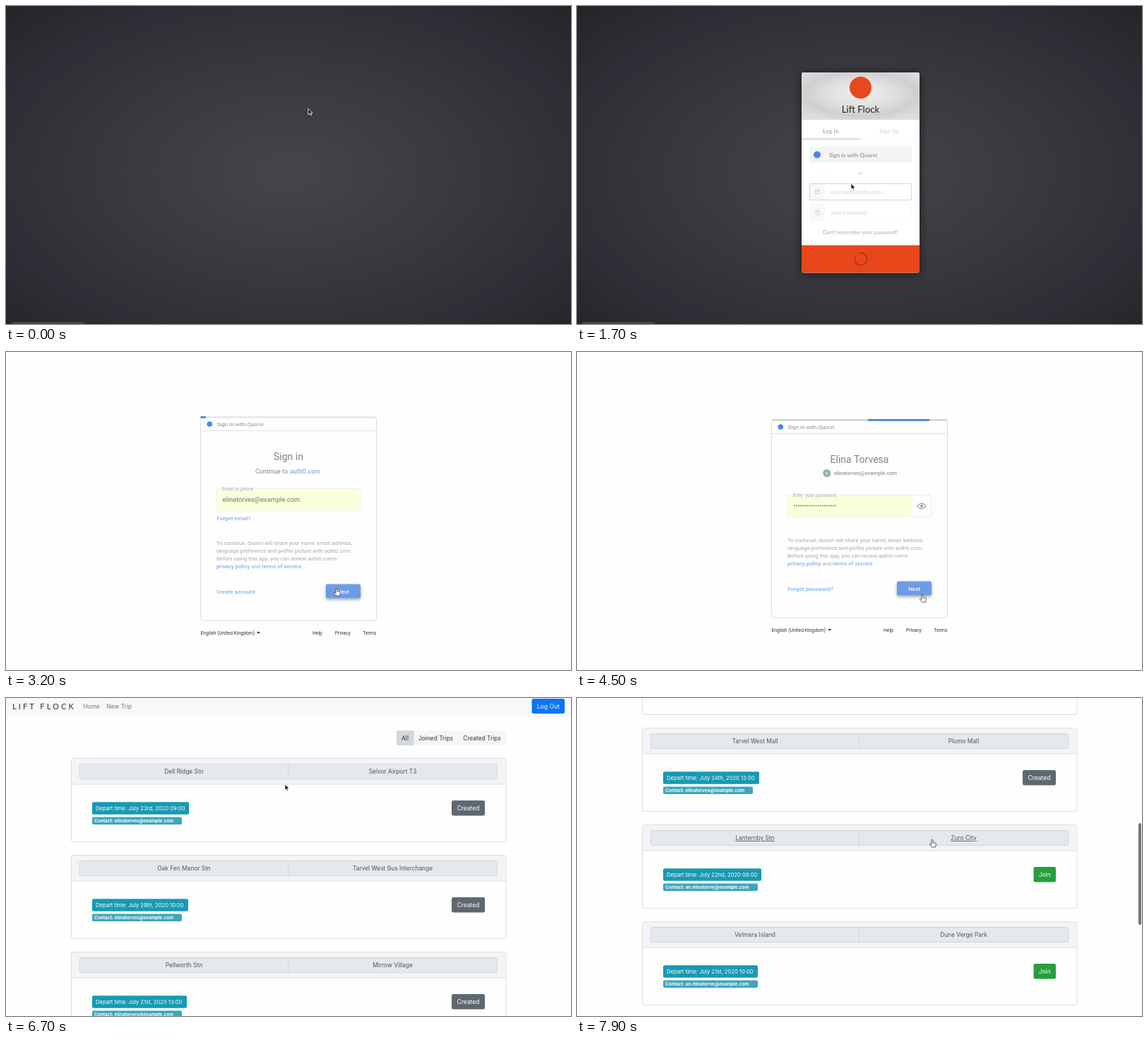
Write an HTML page that moves like this. It is 800 px wide and 450 px high and loops after 8 s.

```html
<!DOCTYPE html>
<html lang="en">
<head>
<meta charset="utf-8">
<style>
html, body { margin: 0; width: 100%; height: 100%; overflow: hidden; background: #fefefe }
svg { display: block; width: 800px; height: 450px }
text { white-space: pre }
.lato { font-family: Lato, sans-serif }
.rob { font-family: Roboto, sans-serif }
.int { font-family: Inter, sans-serif }
</style>
</head>
<body>
<svg viewBox="0 0 800 450">
  <defs>
    <radialGradient id="night" gradientUnits="userSpaceOnUse" cx="0" cy="0" r="1" gradientTransform="translate(400 235) scale(566 330)">
      <stop offset="0" stop-color="#47454b"/><stop offset=".45" stop-color="#39383e"/>
      <stop offset=".75" stop-color="#2f2e36"/><stop offset="1" stop-color="#262429"/>
    </radialGradient>
    <radialGradient id="silver" cx=".5" cy=".45" r=".62">
      <stop offset="0" stop-color="#efefef"/><stop offset=".5" stop-color="#dedede"/>
      <stop offset=".75" stop-color="#cfcfcf"/><stop offset="1" stop-color="#dcdcdc"/>
    </radialGradient>
    <filter id="shade" x="-20%" y="-20%" width="140%" height="140%">
      <feDropShadow dx="0" dy="1" stdDeviation="7" flood-color="#000" flood-opacity=".6"/>
    </filter>
    <filter id="lift" x="-20%" y="-30%" width="140%" height="190%">
      <feDropShadow dx="0" dy="2" stdDeviation="2" flood-color="#000" flood-opacity=".35"/>
    </filter>
    <clipPath id="card"><rect x="318" y="94" width="167" height="283.5" rx="3"/></clipPath>
  </defs>
  <g id="stage"></g>
</svg>
<script>
const LOOP = 8000, STEP = 100;
const BRAND = 'Lift Flock', SSO = 'Quorvi';
const USER = 'Elina Torvesa', MAIL = 'elinatorves@example.com', MAIL2 = 'an.elinatorve@example.com';
const stage = document.getElementById('stage');

const clamp = v => Math.max(0, Math.min(1, v));
const ease = v => v * v * (3 - 2 * v);
const ramp = (t, a, b) => ease(clamp((t - a) / (b - a)));

const text = (x, y, size, str, fill, extra = '') =>
  `<text x="${x}" y="${y}" font-size="${size}" fill="${fill}" ${extra}>${str}</text>`;
const mid = (x, y, size, str, fill, extra = '') => text(x, y, size, str, fill, 'text-anchor="middle" ' + extra);
const rect = (x, y, w, h, fill, extra = '') =>
  `<rect x="${x}" y="${y}" width="${w}" height="${h}" fill="${fill}" ${extra}/>`;
const dot = (x, y, r, fill) => `<circle cx="${x}" cy="${y}" r="${r}" fill="${fill}"/>`;
const path = (d, extra) => `<path d="${d}" ${extra}/>`;
const bold = 'font-weight="700"', medium = 'font-weight="500"';

// Pointer: time, x, y
const TRACK = [
  [0, 428, 145], [800, 428, 145], [1300, 390, 212], [1500, 390, 212], [1700, 388, 251],
  [2200, 388, 251], [3000, 468, 334], [3700, 468, 334], [4100, 489, 343], [4600, 489, 343],
  [5600, 318, 162], [6300, 318, 162], [7000, 445, 96], [7200, 445, 96], [7900, 503, 200]
];
function pointerAt(t) {
  const i = Math.max(1, TRACK.findIndex(k => k[0] >= t));
  const [a, b] = [TRACK[i - 1], TRACK[i]];
  const f = ramp(t, a[0], b[0]);
  return [a[1] + (b[1] - a[1]) * f, a[2] + (b[2] - a[2]) * f];
}
function pointer([x, y], hand) {
  const d = hand
    ? 'M-1 1Q0-1 1 1V4.5L4 5Q5.6 5.2 5.4 7L4.6 11H-.6L-3.6 7.4Q-3.6 5.8-2.2 6.4L-1 7.2Z'
    : 'M0 0V8.6L2 6.8L3.4 9.8L4.8 9.2L3.4 6.3H6Z';
  const paint = hand ? 'fill="#fff" stroke="#333"' : 'fill="#161616" stroke="#fff"';
  return path(d, `transform="translate(${x} ${y})" stroke-width=".8" stroke-linejoin="round" ${paint}`);
}

function loginScene(t) {
  const busy = t >= 1500, show = ramp(t, 200, 600), k = .85 + .15 * show;
  let s = rect(0, 0, 800, 450, 'url(#night)') + rect(8, 447, 102, 5, '#48474d', 'rx="2"');
  if (!show) return s;
  const field = (y, hint, stroke) =>
    rect(329.5, y, 144, 23, '#fff', `rx="1.5" stroke="${stroke}"`) + rect(330, y + .5, 21, 22, '#f1f1f1') +
    text(359, y + 14, 8, hint, '#a8a8a8');
  const icon = 'fill="none" stroke="#999" stroke-width=".8"';
  const form =
    mid(359.5, 180, 7.5, 'Log In', '#555', bold + ' letter-spacing=".4"') +
    mid(442.5, 180, 7.5, 'Sign Up', '#aaa', medium + ' letter-spacing=".4"') +
    rect(318, 188, 167, 1, '#eee') + rect(318, 187.5, 83.5, 1.5, '#9c9ca8') +
    rect(329.5, 199, 144.5, 23, '#e9e9ec', 'rx="2"') +
    text(357, 213.5, 8, 'Sign in with ' + SSO, '#333', bold) +
    mid(401.5, 239, 7.5, 'or', '#999') +
    field(251.5, 'yours@example.com', '#aaaab8') + field(280.5, 'your password', '#eee') +
    path('M337.5 260h6v5.5h-6zl3 3 3-3', icon) +
    path('M338 291h5v4h-5zM339 291v-1.5q1.5-2.5 3 0v1.5', icon) +
    mid(401.5, 323, 7.5, "Don't remember your password?", '#555');
  s += `<g class="lato" opacity="${show}" transform="translate(401.5 235.5) scale(${k}) translate(-401.5 -235.5)">` +
    rect(318, 94, 167, 283.5, '#fff', 'rx="3" filter="url(#shade)"') + '<g clip-path="url(#card)">' +
    rect(318, 94, 167, 67, 'url(#silver)') + dot(401.5, 115.5, 15.5, '#e8481d') +
    mid(401.5, 150.5, 13.3, BRAND, '#222') + form +
    (busy ? rect(318, 161, 167, 178, '#fff', `opacity="${.5 * ramp(t, 1400, 1600)}"`) : '') +
    dot(340, 210.5, 5, '#4a86e8') + rect(318, 338.5, 167, 40, '#e8471c') +
    (busy
      ? `<circle cx="401.7" cy="358" r="8.8" fill="none" stroke="#9c3318" stroke-width="1.2" stroke-dasharray="50 5.3" transform="rotate(${t * .36} 401.7 358)"/>`
      : mid(401.5, 361, 8, 'LOG IN  ›', '#fff', bold)) +
    '</g></g>';
  return s;
}

function consentScene(t) {
  const pass = t >= 3700, d = pass ? 4 : 0;
  const start = pass ? 4100 : 3200, busy = t >= start;
  const top = 91.5 + d, fade = busy ? .55 : 1;
  const gray = '#5f6368', ink = '#202124', blue = '#1a73e8';
  let s = rect(275.5, top, 249, 288.5 - 2 * d, '#fefefe', 'rx="4" stroke="#dadce0"');
  if (t < 2800) return s;

  if (busy) {
    const right = (.03 + (t - start) * .00217) % 1.35;
    const x0 = 275.5 + 249 * Math.max(0, right - .35), x1 = 275.5 + 249 * Math.min(1, right);
    s += rect(276, top - .5, 248, 2.5, pass ? '#d2d3d8' : '#e3e8f0') + rect(x0, top - .5, Math.max(0, x1 - x0), 2.5, '#3a80e0');
  }
  s += rect(276, 111 + d, 248, 1, '#dfe1e6') + dot(288.3, 102 + d, 3.8, '#4a86e8') +
    text(298.5, 105 + d, 8, 'Sign in with ' + SSO, busy ? '#8c8e92' : gray);

  const fy = pass ? 202.5 : 193.5, filled = t >= (pass ? 3900 : 2900);
  let b = mid(400, 153 + d, 14, pass ? USER : 'Sign in', ink);
  if (pass) {
    b += dot(353.8, 171.5, 5.6, '#3d7a57') + mid(353.8, 174, 6, 'E', '#fff') + text(364, 174, 7.5, MAIL, '#3c4043', medium);
  } else {
    b += text(353, 171.5, 9, 'Continue to', ink) + text(402, 171.5, 9, 'auth0.com', blue, medium);
  }
  b += rect(298, fy, 204, 30.5, '#fff', 'rx="2" stroke="#d0d2d8" stroke-width=".8"') +
    (filled ? rect(298.4, fy + .4, pass ? 175 : 203.4, 29.8, '#faffbd', 'rx="1.5"') : '') +
    rect(303, fy - 2, pass ? 66 : 50, 4, '#fefefe') +
    text(305.5, fy + 2.6, 6.8, pass ? 'Enter your password' : 'Email or phone', gray);
  if (pass) {
    if (filled) for (let i = 0; i < 20; i++) b += dot(308 + i * 3.05, 217.5, 1, ink);
    b += path('M482 218q6-7.5 12 0q-6 7.5-12 0z', 'fill="none" stroke="#444" stroke-width="1.2"') + dot(488, 218, 1.9, '#444');
  } else {
    b += (filled ? text(306.5, 211.5, 9.3, MAIL, '#000') : '') + text(298.5, 237.5, 7.8, 'Forgot email?', blue, medium);
  }
  const link = str => `<tspan fill="${blue}" font-weight="500">${str}</tspan>`;
  [`To continue, ${SSO} will share your name, email address,`,
    'language preference and profile picture with auth0.com.',
    "Before using this app, you can review auth0.com's",
    link('privacy policy') + ' and ' + link('terms of service') + '.'
  ].forEach((line, i) => b += text(298, 273 - d + i * 11, 7.75, line, gray));
  b += text(298, 341.5 - d, 8.1, pass ? 'Forgot password?' : 'Create account', blue, medium);
  s += `<g opacity="${fade}">${b}</g>`;

  s += rect(453, 328.5 - d, 49, 20, busy ? '#6e9be6' : blue, 'rx="2" filter="url(#lift)"') +
    mid(477.5, 341.5 - d, 8, 'Next', '#fff', medium);
  const fyy = 399.7 - d;
  s += text(275.5, fyy, 6.8, 'English (United Kingdom)', '#333') +
    path(`M355 ${fyy - 3.6}h5l-2.5 2.6z`, 'fill="#333"') +
    text(434, fyy, 6.8, 'Help', '#333') + text(465.8, fyy, 6.8, 'Privacy', '#333') +
    text(524.3, fyy, 6.8, 'Terms', '#333', 'text-anchor="end"');
  return s;
}

// From, to, departure, badge width, joinable
const TRIPS = [
  ['Dell Ridge Stn', 'Selvor Airport T3', '23rd, 2020 09:00', 137],
  ['Oak Fen Manor Stn', 'Tarvel West Bus Interchange', '29th, 2020 10:00', 136],
  ['Pellworth Stn', 'Mirrow Village', '21st, 2020 13:00', 134],
  ['Ostrel Grove Stn', 'Quillow Market', '25th, 2020 11:00', 136],
  ['Tarvel West Mall', 'Plumo Mall', '24th, 2020 13:00', 136],
  ['Lanternby Stn', 'Zuro City', '22nd, 2020 08:00', 139, true],
  ['Velmara Island', 'Dune Verge Park', '21st, 2020 10:00', 134, true]
];
const TOP = 85, PITCH = 137;

function tripCard([from, to, when, width, join], y, hover) {
  const line = hover ? 'text-decoration="underline"' : '';
  const edge = 'stroke="#dedfe2"', ink = '#50565c';
  return rect(92.5, y + .5, 615.5, 118, '#fefefe', 'rx="2.5" ' + edge) +
    rect(93, y + 1, 614.5, 36, '#f4f4f6', 'rx="2"') + rect(92.5, y + 36.5, 615.5, 1, '#dedfe2') +
    rect(104.3, y + 8.5, 591.2, 21, '#e5e8ec', 'rx="2" stroke="#ced3d9" stroke-width=".9"') +
    rect(399.2, y + 8.5, .9, 21, '#ced3d9') +
    mid(252, y + 22, 8.4, from, ink, line) + mid(547.5, y + 22, 8.4, to, ink, line) +
    rect(122, y + 62.3, width, 17.4, '#179ab2', 'rx="2"') + text(127, y + 74, 7.6, 'Depart time: July ' + when, '#fff') +
    rect(122, y + 83.5, join ? 134 : 127, 10.5, '#3fa5bc', 'rx="2"') +
    text(125, y + 91.2, 6.4, 'Contact: ' + (join ? MAIL2 : MAIL), '#fff', bold) +
    (join
      ? rect(646.5, y + 60, 31.5, 21.5, '#259f3d', 'rx="2.5"') + mid(662.2, y + 74.2, 8.5, 'Join', '#fff')
      : rect(631, y + 60, 47, 21.5, '#5f6870', 'rx="2.5"') + mid(654.5, y + 74.2, 8.5, 'Created', '#fff'));
}

function tripScene(t, hovered, scroll) {
  let s = rect(0, 0, 800, 26.5, '#f7f8f9') +
    text(9, 16, 11.2, BRAND.toUpperCase(), '#333', 'class="lato" letter-spacing="3"') +
    text(109.5, 15.2, 8.4, 'Home', '#777') + text(142.5, 15.2, 8.4, 'New Trip', '#777') +
    rect(744.5, 1, 46.5, 21, '#0a74f7', 'rx="2.5"') + mid(767.8, 15, 8.6, 'Log Out', '#fff') +
    rect(553, 46, 155, 21, '#f5f6f8', 'rx="2"') + rect(553, 46, 24.5, 21, '#d3d8dd', 'rx="2"') +
    mid(565, 59.8, 8.4, 'All', '#333') + mid(608.5, 59.8, 8.4, 'Joined Trips', '#333') + mid(674, 59.8, 8.4, 'Created Trips', '#333');
  if (t >= 5200) TRIPS.forEach((trip, i) => s += tripCard(trip, TOP + i * PITCH, i === hovered));
  s = `<g transform="translate(0 ${-scroll})">${s}</g>`;
  if (scroll > 0) s += rect(795, 2 + scroll * 175 / 591, 4, 144, '#737278', 'rx="2"');
  return s;
}

function render(t) {
  const p = pointerAt(t), [x, y] = p;
  let s, kind, hand = false;
  if (t < 2100) {
    kind = 'lato';
    hand = t >= 600 && t < 1500 && y > 199 && y < 222;
    s = loginScene(t);
  } else if (t < 4800) {
    kind = 'rob';
    hand = t >= 2800 && x > 453 && y > 324;
    s = t < 2500 ? '' : consentScene(t);
  } else {
    kind = 'int';
    const scroll = 591 * ramp(t, 7200, 7900);
    const rel = y + scroll - TOP, inRow = rel % PITCH;
    hand = t >= 5200 && inRow > 8 && inRow < 30;
    s = t < 5000 ? '' : tripScene(t, hand ? Math.floor(rel / PITCH) : -1, scroll);
  }
  stage.setAttribute('class', kind);
  stage.innerHTML = s + pointer(p, hand);
}

let last = -1;
function tick() {
  const t = Math.floor(performance.now() % LOOP / STEP) * STEP;
  if (t !== last) render(last = t);
  requestAnimationFrame(tick);
}
tick();
</script>
</body>
</html>
```
